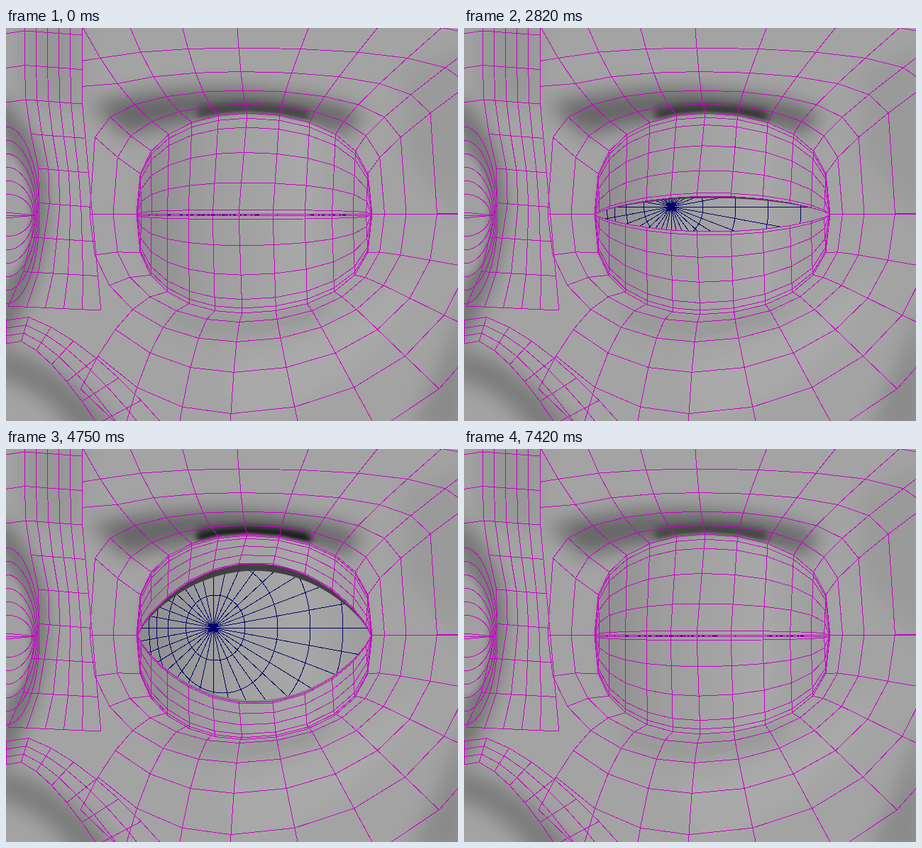
An HTML page that plays this animation: 637x554 px, repeating every 7570 ms.

```html
<!DOCTYPE html>
<html>
<head>
<meta charset="utf-8">
<style>
html, body { margin: 0; width: 100%; height: 100%; overflow: hidden; background: #a3a3a3 }
svg { display: block }
.wire, .ball { fill: none; shape-rendering: crispEdges }
.wire { stroke: #c800c8 }
.ball { stroke: #000068 }
</style>
</head>
<body>
<svg width="637" height="554" viewBox="0 0 637 554">
  <defs>
    <filter id="b2" x="-50%" y="-50%" width="200%" height="200%"><feGaussianBlur stdDeviation="2.5"/></filter>
    <filter id="b5" x="-50%" y="-200%" width="200%" height="500%"><feGaussianBlur stdDeviation="5"/></filter>
    <filter id="b14" x="-100%" y="-150%" width="300%" height="400%"><feGaussianBlur stdDeviation="14"/></filter>
    <linearGradient id="skin">
      <stop offset="0" stop-color="#8c8c8c"/><stop offset=".3" stop-color="#9e9e9e"/>
      <stop offset=".7" stop-color="#a8a8a8"/><stop offset="1" stop-color="#9c9c9c"/>
    </linearGradient>
    <clipPath id="hole"><path id="gap"/></clipPath>
  </defs>
  <rect width="637" height="554" fill="#a3a3a3"/>
  <g filter="url(#b14)">
    <path d="M-20,110 Q46,170 40,262 Q36,350 -20,440" fill="none" stroke="#000" stroke-width="30" opacity=".35"/>
    <path d="M-20,455 Q60,450 165,575 L100,575 Q60,510 -20,490Z" opacity=".25"/>
    <path d="M650,380 L650,570 L570,570Z" opacity=".15"/>
    <path d="M20,-20 L110,-20 L105,110 L20,110Z" opacity=".07"/>
    <path d="M560,60 L650,20 L650,280 L560,180Z" opacity=".05"/>
    <path d="M120,108 Q330,60 500,118 L485,150 Q330,110 170,150Z" opacity=".38"/>
    <path d="M210,385 Q330,440 460,385 L440,420 Q330,440 240,420Z" opacity=".1"/>
    <path d="M330,560 Q540,500 590,330 L520,380 Q450,440 300,470Z" fill="#fff" opacity=".07"/>
  </g>
  <ellipse cx="0" cy="264" rx="34" ry="85" fill="#a0a0a0" filter="url(#b5)"/>
  <path d="M270,119 Q342,104 425,122" fill="none" stroke="#000" stroke-width="16" filter="url(#b5)" opacity=".3"/>
  <path id="crease" d="M270,126 Q342,108 430,128" fill="none" stroke="#000" stroke-width="11" filter="url(#b5)"/>
  <path id="lid" fill="url(#skin)" filter="url(#b2)"/>
  <g clip-path="url(#hole)">
    <rect x="186" y="130" width="328" height="260" fill="url(#skin)"/>
    <path id="ball" class="ball"/>
    <path id="rimUp" fill="#404040"/>
    <path id="rimLow" fill="#858585"/>
  </g>
  <path id="still" class="wire"/>
  <path id="mesh" class="wire"/>
  <path id="slit" class="ball" d="M245,263.5H352M430,263.5H480" stroke-dasharray="4 6 2 3"/>
</svg>
<script>
const $ = id => document.getElementById(id);
const range = (n, f) => Array.from({ length: n }, (_, i) => f(i));
const line = pts => 'M' + pts.map(p => p[0].toFixed(1) + ',' + p[1].toFixed(1)).join('L');
const grid = rows => rows.map(line).join('') + rows[0].map((_, i) => line(rows.map(r => r[i]))).join('');
const mix = (a, b, f) => a + (b - a) * f;
const mid = 262, spokes = 13;

// Ring k around the eye (0 is the lid crease), upper half side = -1, lower half side = 1
function ring(k, side) {
  const cx = side < 0 ? 340 - 3 * k : 333 - 4 * k;
  const left = 184 - 33 * k, right = 516 + 11 * k + 6.5 * k * k;
  const height = side < 0 ? 142 + 9 * k + 3.5 * k * k : 140 + 5 * k + 7.6 * k * k;
  const power = side < 0 ? .68 * .72 ** k : .7 + .07 * k;
  return range(spokes, j => {
    const a = j * Math.PI / 12, c = Math.cos(a);
    return [cx - c * (c > 0 ? cx - left : right - cx),
      mid + side * height * Math.abs(Math.sin(a)) ** power];
  });
}

function stillMesh() {
  let d = '';
  for (const side of [-1, 1]) {
    const rings = range(6, k => ring(k, side));
    rings.slice(1).forEach((r, i) => d += line(i < 2 ? r : r.slice(3)));
    for (let j = 0; j < spokes; j++) d += line(rings.slice(0, j < 3 ? 3 : 6).map(r => r[j]));
    if (side < 0) for (const k of [3, 4]) d += line([[107, rings[k][3][1] + 4], rings[k][3]]);
  }
  // Bridge of the nose
  const bridge = range(9, i => {
    const y = 10 + i * 48.5;
    const left = 26 + 22 * Math.exp(-(((y - 230) / 80) ** 2)) - Math.max(0, y - 340) * .4;
    const right = 107 + Math.max(0, y - 100) * .09;
    return range(6, c => [mix(left, right, c / 5), y - 6 * (1 - c / 5)]);
  });
  d += grid([bridge[0].map(([x]) => [x, -4]), ...bridge]);
  for (const r of bridge.slice(0, 3)) d += line([[0, r[0][1] + 4], r[0]]);
  // Wing of the nose
  d += grid(range(4, k => range(8, i => {
    const u = i / 7, x = u * (222 - 24 * k);
    return [x, 400 + 11 * k + 12 * Math.exp(-x / 10) + 160 * u ** 1.6];
  })));
  // Corner of the other eye
  for (let k = 0; k < 6; k++) {
    const w = 37 + 2 * k, h = 30 + 19 * k;
    d += `M0,${264 - h}A${w},${h} 0 0 1 0,${264 + h}`;
  }
  for (const y of [260, 264, 268]) d += `M0,${y}L42,264`;
  return d;
}

// Eyeball: meridians from a pole left of the centre, and circles that spread to the right
function ballMesh() {
  let d = '';
  for (let i = 0; i < 32; i++) {
    const a = i * Math.PI / 16;
    d += `M292,252l${260 * Math.cos(a)},${240 * Math.sin(a)}`;
  }
  for (let k = 1; k < 5; k++) {
    const l = 292 - 110 * (1 - .65 ** k), w = (291 + 46 * k - l) / 2, h = 46 * k;
    d += `M${l},252a${w},${h} 0 1 1 ${2 * w},0a${w},${h} 0 1 1 ${-2 * w},0`;
  }
  return d;
}

const bulge = x => Math.max(0, 1 - ((x - 350) / 164) ** 2) ** .8;
const edge = (y, h) => range(42, i => [186 + i * 8, y + h * bulge(186 + i * 8)]);
const area = (a, b) => line([...a, ...b.slice().reverse()]) + 'Z';

function lidMesh(crease, y, h) {
  const rim = range(spokes, j => {
    const c = Math.cos(j * Math.PI / 12), x = 328 - c * (c > 0 ? 142 : 186);
    return [x, y + h * bulge(x)];
  });
  return grid([0, .05, .14, .39, .69, .96, 1].map(f =>
    crease.map((p, j) => [mix(p[0], rim[j][0], f), mix(p[1], rim[j][1], f)])));
}

function draw(o) {
  const up = -106 * o, low = 99 * o;
  const over = ring(0, -1), under = ring(0, 1).map(([x, y]) => [x, y + 8 * o * bulge(x)]);
  const top = edge(262, up), bottom = edge(264, low);
  $('mesh').setAttribute('d', lidMesh(over, 262, up) + lidMesh(under, 264, low));
  $('lid').setAttribute('d', area(over, under));
  $('gap').setAttribute('d', area(top, bottom));
  $('rimUp').setAttribute('d', area(top, edge(262, up + 11 * o)));
  $('rimLow').setAttribute('d', area(bottom, edge(264, low - 4 * o)));
  $('crease').setAttribute('opacity', Math.min(.85, .15 + o));
  $('slit').style.display = o ? 'none' : '';
}

// Step number and how far the lids are open; eased in between
const keys = [[0, 0], [4, 0], [8, .29], [9, .29], [14, 1.06], [15, 1.06], [20, .14], [21, .14],
  [23, .05], [25, .05], [26, 0], [32, .95], [34, .95], [36, .86], [37, .86], [39, .66], [40, .66],
  [43, 0], [99, 0]];
function opening(n) {
  const i = keys.findIndex(k => k[0] > n), [a, from] = keys[i - 1], [b, to] = keys[i];
  const u = (n - a) / (b - a);
  return mix(from, to, u * u * (3 - 2 * u));
}

$('still').setAttribute('d', stillMesh());
$('ball').setAttribute('d', ballMesh());
const loop = 7570, step = loop / 51;
let shown = -1;
function tick() {
  const n = Math.floor((performance.now() % loop + 10) / step);
  if (n !== shown) draw(opening(shown = n));
  requestAnimationFrame(tick);
}
tick();
</script>
</body>
</html>
```
